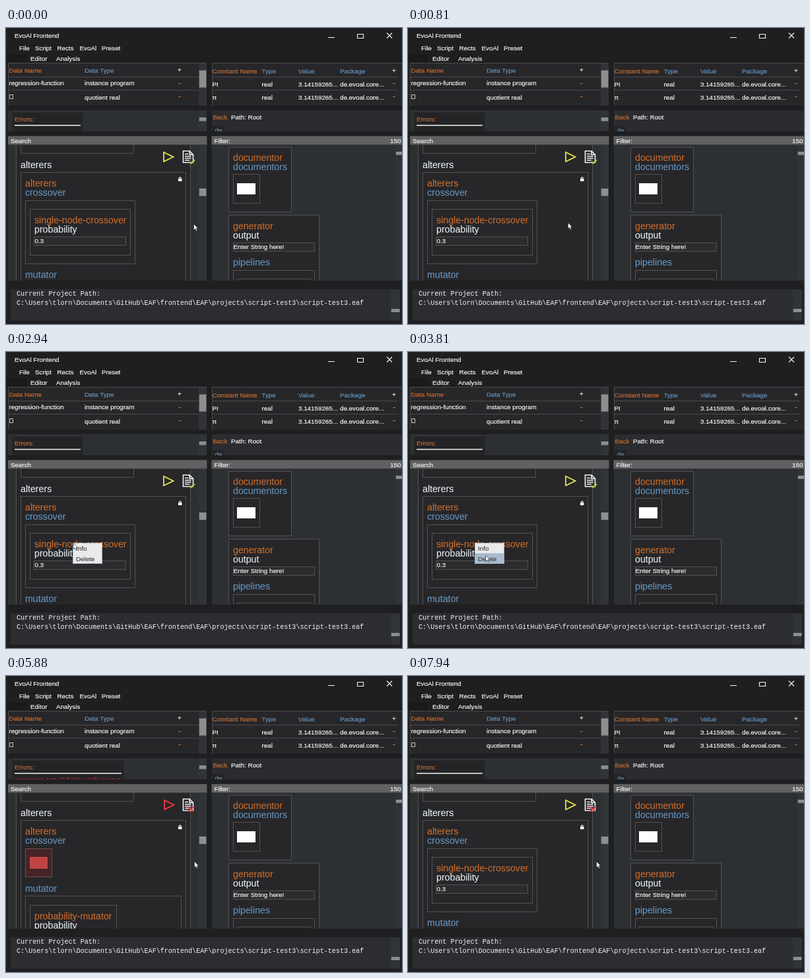
An HTML page that plays this animation: 600x450 px, repeating every 8000 ms.

```html
<!DOCTYPE html>
<html lang="en">
<head>
<meta charset="utf-8">
<title>EvoAl Frontend</title>
<style>
html, body { margin: 0; width: 100%; height: 100%; overflow: hidden; background: #1f1f21; }
svg { display: block; width: 600px; height: 450px; }
text { font: 9.8px "Liberation Sans", Arial, sans-serif; white-space: pre; stroke-width: .2px; }
text.big { font-size: 14.2px; stroke-width: .1px; }
text.mono { font: 10.08px "Liberation Mono", "Courier New", monospace; stroke-width: 0; }
</style>
</head>
<body>
<svg id="stage" viewBox="0 0 600 450" xmlns="http://www.w3.org/2000/svg"></svg>
<script>
const LOOP = 8000;
const C = {
  bg: '#1f1f21', panel: '#2d3033', box: '#272629', edge: '#525254', bar: '#616163',
  thumb: '#8d8e90', orange: '#cb6c2b', blue: '#6494bd', white: '#f4f4f4', pale: '#e4eef2',
  red: '#f03a3e', yellow: '#e2e450', green: '#a6d23c'
};
const TIMES = { menu: 2600, remove: 3950, undo: 6900 };
// Each move: start, end, from, to
const MOVES = [
  [500, 1500, [284.5, 298], [101.5, 289.5]],
  [2850, 3500, [101.5, 289.5], [117.5, 309]],
  [4750, 5500, [117.5, 309], [285.5, 282]]
];

const rect = (x, y, x2, y2, fill, extra = '') =>
  `<rect x="${x}" y="${y}" width="${x2 - x}" height="${y2 - y}" fill="${fill}" ${extra}/>`;
const frame = (x, y, x2, y2, fill = C.box, edge = C.edge) =>
  rect(x + .5, y + .5, x2 + .5, y2 + .5, fill, `stroke="${edge}"`);
const text = (x, y, s, fill = C.white, cls = '') =>
  `<text x="${x}" y="${y}" fill="${fill}" stroke="${fill}" class="${cls}">${s}</text>`;
const big = (x, y, s, fill = C.pale) => text(x, y, s, fill, 'big');
const path = (d, stroke, w = 1, fill = 'none') =>
  `<path d="${d}" stroke="${stroke}" stroke-width="${w}" fill="${fill}"/>`;
const group = (id, body) => `<g id="${id}">${body}</g>`;
const clip = (id, x, y, x2, y2) => `<clipPath id="${id}">${rect(x, y, x2, y2, '#000')}</clipPath>`;
const clipped = (id, body) => `<g clip-path="url(#${id})">${body}</g>`;
const scroll = (x, y, x2, y2, t1, t2) =>
  rect(x, y, x2, y2, '#313437') + rect(x + .7, t1, x2 - .5, t2, C.thumb);

const titleBar = () =>
  text(13, 15, 'EvoAl Frontend') +
  path('M488 14.5H498M532.5 9.5H541.5V15.5H532.5ZM577 7.5L585 15.5M585 7.5L577 15.5', C.white, 1.1) +
  [[20, 'File'], [44, 'Script'], [77.5, 'Rects'], [111.5, 'EvoAl'], [145, 'Preset']]
    .map(([x, s]) => text(x, 34, s)).join('') +
  rect(0, 40, 30, 52, '#1a1a1c') + text(37, 49.5, 'Editor') + text(76, 49.5, 'Analysis');

const tables = () =>
  rect(3, 53, 304, 118, C.box) + rect(312, 53, 600, 118, C.box) +
  scroll(292, 54, 304, 118, 64.5, 90.5) +
  path('M3.5 118V53.5H304M3 74.5H292M3 94.5H292M312.5 118V53.5H600M312 74.5H594M312 94.5H594', '#4b4b4d') +
  text(4.5, 67.5, 'Data Name', C.orange) + text(119, 67.5, 'Data Type', C.blue) + text(260, 67, '+') +
  text(4.5, 87.3, 'regression-function') + text(119, 87.3, 'instance program') +
  text(119, 108.5, 'quotient real') + path('M5.5 101.5H10.5V107.5H5.5Z', C.white, .8) +
  text(312.5, 68.5, 'Constant Name', C.orange) + text(387.5, 68.5, 'Type', C.blue) +
  text(443, 68.5, 'Value', C.blue) + text(506, 68.5, 'Package', C.blue) + text(585, 68, '+') +
  text(312.5, 88.8, 'PI') + text(312.5, 108.8, 'π') +
  [88.8, 108.8].map(y =>
    text(387.5, y, 'real') + text(443, y, '3.14159265...') + text(506, y, 'de.evoal.core...') +
    [261, 586].map(x => rect(x, y - 4.8, x + 4, y - 3.8, C.orange)).join('')).join('');

const errorBox = (right, extra = '') =>
  frame(9, 128, right, 160, '#242326', '#2a2a2c') + text(13, 142, 'Errors:', C.orange) +
  rect(13, 147.3, right - 3, 148.8, C.white) + extra;

const messages = () =>
  rect(3, 125, 304, 157, C.panel) + rect(312, 125, 600, 157, '#2b2c2f') +
  clipped('strip',
    group('errorsOk', errorBox(116)) +
    group('errorsBad', errorBox(178, text(13, 160.5, 'crossover: Not all fields set for layout', '#d8262c'))) +
    rect(313, 149, 330, 160, '#242326') + text(316.5, 159, 'de', C.blue)) +
  scroll(292, 125, 304, 157, 136, 141.5) +
  text(313.5, 138.5, 'Back', C.orange) + text(341, 138.5, 'Path: Root');

const filled = () =>
  frame(29, 262, 195, 358) + frame(36, 275, 188, 345) +
  big(43, 296.5, 'single-node-crossover', C.orange) + big(43, 310.5, 'probability') +
  frame(42, 317, 181, 330, '#2c2b2e') + text(43.5, 327.3, '0.3') +
  big(29, 380, 'mutator', C.blue);

const empty = () =>
  frame(29, 262, 69, 305, '#452426', '#685052') + rect(36, 275, 63, 293, '#c14445') +
  big(29, 328, 'mutator', C.blue) +
  frame(29, 334, 265, 400) + frame(36, 348, 167, 400) +
  big(43, 369.5, 'probability-mutator', C.orange) + big(43, 383.5, 'probability');

const icons = () =>
  group('play', path('M239 189V203L253.5 196Z', 'currentColor', 1.8)) +
  path('M268.5 187H278L283.5 192.5V204.5H268.5ZM278 187V192.5H283', C.white, 1.6) +
  path('M271 191.5H276M271 195H280.5M271 198H280.5M271 201H278', C.white, 1.3) +
  group('check', path('M278 203.5L280.5 206L286 200.5', C.green, 1.8)) +
  group('cross', path('M276 199L284 206M284 199L276 206', C.red, 2)) +
  rect(261, 229, 266.5, 233, C.white) + path('M262.3 229.5V228A1.5 1.5 0 0 1 265.2 228V229.5', C.white, 1.1);

const editor = () =>
  rect(3, 164.3, 304.5, 177.5, C.bar) + text(7, 174.5, 'Search') +
  rect(3, 178, 304, 384, C.panel) +
  clipped('left',
    frame(15, 160, 279, 400) + frame(22, 160, 193, 190) + big(22, 213, 'alterers') +
    frame(22, 219, 272, 400) + big(29, 241, 'alterers', C.orange) + big(29, 255, 'crossover', C.blue) +
    group('filled', filled()) + group('empty', empty()) + icons()) +
  scroll(292, 178, 304, 384, 244, 255.3);

const library = () =>
  rect(311.5, 164.3, 600, 177.5, C.bar) + text(315.5, 174.5, 'Filter:') + text(582, 174.5, '150') +
  rect(312, 178, 600, 384, C.panel) + scroll(590, 178, 601, 384, 188, 193) +
  clipped('right',
    frame(337, 181, 432, 279) + big(344, 202, 'documentor', C.orange) + big(344, 216, 'documentors', C.blue) +
    frame(344, 222, 384, 266) + rect(350, 236, 378, 253, '#fff') +
    frame(337, 284, 474, 400) + big(344, 306, 'generator', C.orange) + big(344, 319.5, 'output') +
    frame(344, 326, 467, 339, '#2c2b2e') + text(344.5, 336.3, 'Enter String here!') +
    big(344, 361, 'pipelines', C.blue) + frame(344, 368, 467, 400) + frame(350, 381, 461, 400));

const log = () =>
  rect(7, 397, 597, 445, '#2b2d30') + scroll(583, 398, 597, 444, 427, 432) +
  text(16, 407.2, 'Current Project Path:', C.white, 'mono') +
  text(16, 420.7, 'C:\\Users\\tlorn\\Documents\\GitHub\\EAF\\frontend\\EAF\\projects\\script-test3\\script-test3.eaf', C.white, 'mono');

const menu = () =>
  rect(101, 290, 146, 322, '#eaeaea') +
  group('hover', rect(101.5, 306, 145.5, 321.5, '#a9bccd')) +
  text(106, 302, 'Info', '#444') + text(106, 317.5, 'Delete', '#3c4650') +
  path('M101.5 290.5H145.5V321.5H101.5Z', '#a9b4be');

const arrow = path('M0 0V9.2L2.1 7.3L3.6 10.6L5.2 9.9L3.8 6.7H6.6Z', '#111', .6, '#fff');

const stage = document.getElementById('stage');
stage.innerHTML =
  `<defs>${clip('strip', 3, 125, 600, 157)}${clip('left', 3, 178, 292, 384)}${clip('right', 312, 178, 590, 384)}</defs>` +
  rect(0, 0, 600, 450, C.bg) + titleBar() + tables() + messages() + editor() + library() + log() +
  group('menu', menu()) + group('cursor', arrow);

const el = id => document.getElementById(id);
const show = (id, on) => el(id).setAttribute('visibility', on ? 'visible' : 'hidden');
const ease = p => p * p * (3 - 2 * p);

function cursorAt(t) {
  let pos = MOVES[0][2];
  for (const [start, end, from, to] of MOVES) {
    if (t < start) break;
    const k = ease(Math.min(1, (t - start) / (end - start)));
    pos = from.map((v, i) => v + (to[i] - v) * k);
  }
  return pos;
}

function draw(t) {
  const [x, y] = cursorAt(t);
  const open = t >= TIMES.menu && t < TIMES.remove;
  const removed = t >= TIMES.remove && t < TIMES.undo;
  el('cursor').setAttribute('transform', `translate(${x.toFixed(2)} ${y.toFixed(2)})`);
  show('menu', open);
  show('hover', open && y > 306);
  show('filled', !removed);
  show('empty', removed);
  show('errorsOk', !removed);
  show('errorsBad', removed);
  show('check', t < TIMES.remove);
  show('cross', t >= TIMES.remove);
  el('play').setAttribute('color', removed ? C.red : C.yellow);
  el('play').setAttribute('transform', `translate(${removed ? 1 : 0} 0)`);
}

const begin = performance.now();
function tick() {
  draw((performance.now() - begin) % LOOP);
  requestAnimationFrame(tick);
}
tick();
</script>
</body>
</html>
```
